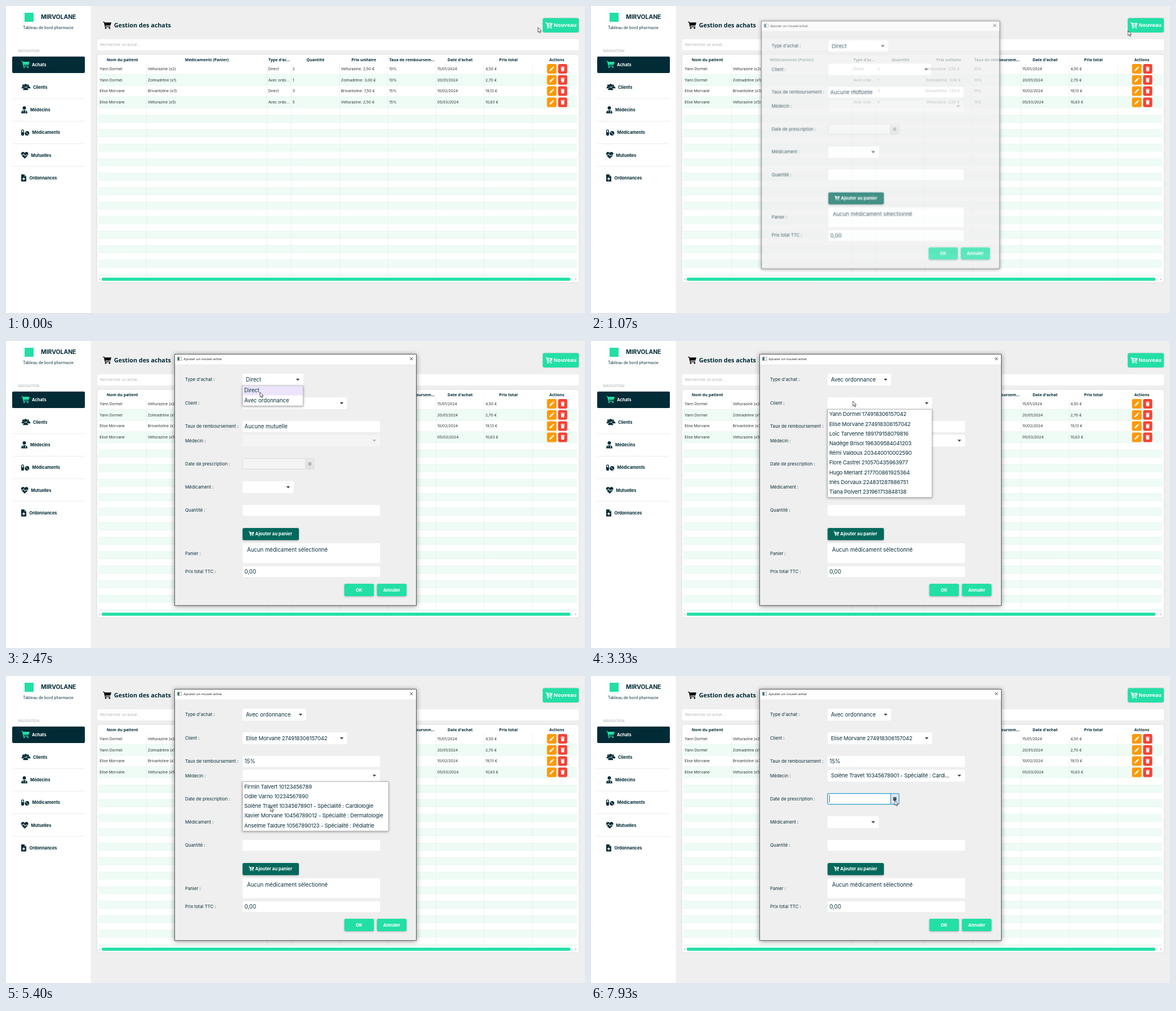
Animation of 1028x545 px, one loop 8 s. Source, as an HTML page:

```html
<!DOCTYPE html>
<html lang="fr">
<head>
<meta charset="utf-8">
<title>Gestion des achats</title>
<style>
html, body { margin: 0; width: 100%; height: 100%; overflow: hidden; background: #efefef; }
svg { display: block; }
text { font-family: Inter, "Noto Sans", sans-serif; fill: #0b303c; white-space: pre; }
.mid { text-anchor: middle; }
.brand { font-size: 10.4px; font-weight: 700; fill: #012b36; }
.sub { font-size: 6.95px; }
.section { font-size: 6.2px; fill: #a9aeb0; }
.nav { font-size: 7.45px; font-weight: 700; fill: #012b36; }
.white { fill: #fff; }
.title, .new, .head, .win { font-family: "Open Sans", "Noto Sans", sans-serif; font-weight: 700; fill: #012b36; }
.title { font-size: 10.8px; }
.new { font-size: 9px; fill: #fff; }
.head { font-size: 7.1px; }
.win { font-size: 6.1px; font-weight: 400; fill: #111; }
.hint { font-size: 6.7px; fill: #b0b0b0; }
.cell { font-size: 6.7px; fill: #2b3033; }
.label { font-size: 7.85px; }
.val { font-size: 9.65px; }
.tight { font-size: 9.6px; letter-spacing: -.2px; }
.btn { font-size: 7.8px; font-weight: 700; fill: #fff; }
.shade { filter: drop-shadow(0 1px 1.5px rgba(0,0,0,.25)); }
.menu { filter: drop-shadow(0 1.5px 2px rgba(0,0,0,.35)); }

.step { animation: 8s step-end infinite; }
#hover { animation-name: hover; }
#typeMenu { animation-name: typeMenu; }
#direct { animation-name: direct; }
#avec { animation-name: avec; }
#late { animation-name: late; }
#clientMenu { animation-name: clientMenu; }
#noClient { animation-name: noClient; }
#client { animation-name: client; }
#doctorMenu { animation-name: doctorMenu; }
#doctor { animation-name: doctor; }
#focus { animation-name: focus; }
#calHover { animation-name: calHover; }
#caret { animation-name: caret; }
#arrow { animation-name: arrow; }
#beam { animation-name: beam; }
#modal { transform-origin: 514px 246.5px; animation: open 8s linear infinite; }
#cursor { animation: move 8s ease-in-out infinite; }

@keyframes hover { 0%, 11.625% { opacity: 0 } 2.5% { opacity: .5 } 9.125% { opacity: 1 } }
@keyframes open {
  0%, 11.4% { opacity: 0; transform: scale(.92) }
  12.5% { opacity: .5; transform: scale(.97) }
  13.4% { opacity: .74; transform: scale(.986) }
  15.2%, 100% { opacity: 1; transform: none }
}
@keyframes typeMenu { 0%, 35% { opacity: 0 } 28.375% { opacity: 1 } }
@keyframes direct { 0% { opacity: 1 } 35% { opacity: 0 } 100% { opacity: 0 } }
@keyframes avec { 0% { opacity: 0 } 35%, 100% { opacity: 1 } }
@keyframes late { 0% { opacity: .35 } 35%, 100% { opacity: 1 } }
@keyframes clientMenu { 0%, 48.375% { opacity: 0 } 41.625% { opacity: 1 } }
@keyframes noClient { 0% { opacity: 1 } 48.375%, 100% { opacity: 0 } }
@keyframes client { 0% { opacity: 0 } 48.375%, 100% { opacity: 1 } }
@keyframes doctorMenu { 0%, 70.875% { opacity: 0 } 60.875% { opacity: 1 } }
@keyframes doctor { 0% { opacity: 0 } 70.875%, 100% { opacity: 1 } }
@keyframes focus { 0% { opacity: 0 } 81.625%, 100% { opacity: 1 } }
@keyframes calHover { 0% { opacity: 0 } 88.375%, 100% { opacity: 1 } }
@keyframes caret { 0%, 88.375% { opacity: 0 } 83.375%, 94.125%, 100% { opacity: 1 } }
@keyframes arrow { 0%, 54%, 88.375%, 100% { opacity: 1 } 49.1%, 71.6% { opacity: 0 } }
@keyframes beam { 0%, 54%, 88.375%, 100% { opacity: 0 } 49.1%, 71.6% { opacity: 1 } }
@keyframes move {
  0%, .8% { transform: translate(944.5px, 38px) }
  3.4%, 11.3% { transform: translate(956px, 38px) }
  12.4%, 13.5% { transform: translate(953.5px, 44px) }
  16.6%, 20.4% { transform: translate(547px, 130px) }
  26.6%, 28.4% { transform: translate(463px, 68px) }
  30.8% { transform: translate(451px, 91px) }
  32.5%, 35.2% { transform: translate(449px, 102px) }
  39.1%, 41.6% { transform: translate(465px, 107px) }
  49.1%, 51.3% { transform: translate(470.5px, 155px) }
  58.4%, 61.2% { transform: translate(485px, 177px) }
  67.4%, 68.5% { transform: translate(469.5px, 232px) }
  70.5%, 75.5% { transform: translate(470px, 230.5px) }
  81.6%, 83% { transform: translate(470px, 218px) }
  85%, 88% { transform: translate(536px, 218px) }
  90.9%, 98% { transform: translate(541px, 219px) }
  99.1%, 100% { transform: translate(539.3px, 221px) }
}
</style>
</head>
<body>
<svg id="stage" width="1028" height="545" viewBox="0 0 1028 545">
  <defs>
    <symbol id="cart" viewBox="0 0 16 14">
      <path d="M0 0H2.8L3.2 1.6H16L14.2 7.6H4.7L5 9.2H14V10.6H3.9L1.9 1.4H0Z"/>
      <circle cx="5.4" cy="12.5" r="1.4"/><circle cx="12.6" cy="12.5" r="1.4"/>
    </symbol>
    <symbol id="pencil" viewBox="0 0 10 10">
      <path d="M.5 9.5L1.1 6.9L6.2 1.8L8.2 3.8L3.1 8.9ZM6.8 1.2L7.6.4Q8 .1 8.4 .4L9.6 1.6Q9.9 2 9.6 2.4L8.8 3.2Z"/>
    </symbol>
    <symbol id="trash" viewBox="0 0 10 10">
      <path d="M1 .9H3.6L4 .3H6L6.4 .9H9V2H1ZM1.7 2.6H8.3L7.9 9Q7.8 9.8 7 9.8H3Q2.2 9.8 2.1 9Z"/>
    </symbol>
    <linearGradient id="grey" x2="0" y2="1">
      <stop stop-color="#e4e4e4"/><stop offset="1" stop-color="#c9c9c9"/>
    </linearGradient>
  </defs>
</svg>
<script>
const GREEN = '#22dfa6', DARK = '#012b36';

const rect = (x, y, w, h, fill, r = 0, more = '') =>
  `<rect x="${x}" y="${y}" width="${w}" height="${h}" rx="${r}" fill="${fill}" ${more}/>`;
const text = (x, y, str, cls) => `<text x="${x}" y="${y}" class="${cls}">${str}</text>`;
const path = (d, fill, more = '') => `<path d="${d}" fill="${fill}" ${more}/>`;
const line = (d, stroke, w = 1) => path(d, 'none', `stroke="${stroke}" stroke-width="${w}"`);
const icon = (id, x, y, w, h, fill) =>
  `<use href="#${id}" x="${x}" y="${y}" width="${w}" height="${h}" fill="${fill}"/>`;
const dot = (x, y, r, fill = DARK) => `<circle cx="${x}" cy="${y}" r="${r}" fill="${fill}"/>`;
const step = (id, body) => `<g id="${id}" class="step">${body}</g>`;
const field = (y, h, w = 244) => rect(420, y, w, h, '#fff', 2);
const caretDown = (x, y) => path(`M${x - 3.3} ${y - 1.6}h6.6l-3.3 3.6z`, '#444');

function sidebar() {
  const items = [['Achats', 46], ['Clients', 48], ['Médecins', 43], ['Médicaments', 46.5], ['Mutuelles', 44.5], ['Ordonnances', 41.5]];
  const person = (x, y, s) =>
    dot(x, y - 2.6 * s, 2.2 * s) + path(`M${x - 3.6 * s} ${y + 4 * s}q0 -4 3.6 -4h${.01}q3.6 0 3.6 4z`, DARK);
  const icons =
    icon('cart', 27, 97.5, 15, 13, GREEN) +
    person(30.5, 143, .8) + person(39, 143, .8) +
    path('M30 149.5q0 -5 4.8 -5q4.8 0 4.8 5z', DARK, 'stroke="#fff" stroke-width=".6"') + dot(34.8, 141, 2.7) +
    dot(32.5, 181, 3) + path('M27 190.4q0 -5.4 5.5 -5.4q5.5 0 5.5 5.4z', DARK) +
    line('M30.5 185.5v3M34.5 185.5v2', '#fff', .8) + dot(34.5, 188.2, .9, '#fff') +
    rect(27, 219.3, 5, 11, DARK, 2.5) + rect(28.3, 220.6, 2.4, 3.6, '#fff', 1.2) +
    dot(37.3, 226, 4) + line('M34 222.7l6.6 6.6', '#fff', 1) +
    path('M33.2 271L27.8 265.4Q25.8 262.4 27.8 260Q30.6 257.8 33.2 260.8Q35.8 257.8 38.6 260Q40.6 262.4 38.6 265.4Z', DARK) +
    line('M26.5 264.6h3.6l1.4 -2.4l2 4.6l1.5 -2.2h5', '#fff', 1) +
    path('M27 299h5.6l3.4 3.4v8.6q0 .6 -.6 .6h-7.8q-.6 0 -.6 -.6z', DARK) +
    path('M32.6 299v3.4h3.4z', '#8fa3a8') + line('M31.5 304.3v5M29 306.8h5', '#fff', 1.4);
  return rect(0, 0, 150.5, 545, '#fff') + rect(33, 12, 16, 16, GREEN) +
    text(62, 23.4, 'MIRVOLANE', 'brand') + text(30, 41, 'Tableau de bord pharmacie', 'sub') +
    text(21.5, 82, 'NAVIGATION', 'section') + rect(11, 89.7, 129, 29.3, DARK, 2) +
    [164.5, 204.5, 244.5, 284.5].map(y => line(`M11 ${y}H140`, '#ececec')).join('') +
    items.map(([name, x], i) => text(x, 106.8 + 40.2 * i, name, i ? 'nav' : 'nav white')).join('') + icons;
}

function table() {
  const cols = [164, 249.5, 463.5, 506.5, 592.5, 678, 763.5, 849, 935, 1014];
  const heads = ['Nom du patient', 'Médicaments (Panier)', 'Type d\'ac...', 'Quantité', 'Prix unitaire',
    'Taux de remboursem...', 'Date d\'achat', 'Prix total', 'Actions'];
  const yann = 'Yann Dormel', elise = 'Elise Morvane', rx = 'Avec ordo...';
  const rows = [
    [yann, 'Velturazine (x2)', 'Direct', '2', 'Velturazine: 2,50 €', '10%', '15/01/2024', '4,50 €'],
    [yann, 'Zolmadrène (x1)', rx, '1', 'Zolmadrène: 3,00 €', '10%', '20/01/2024', '2,70 €'],
    [elise, 'Brivantoline (x3)', 'Direct', '3', 'Brivantoline: 7,50 €', '15%', '10/02/2024', '19,13 €'],
    [elise, 'Velturazine (x5)', rx, '5', 'Velturazine: 2,50 €', '15%', '05/03/2024', '10,63 €'],
  ];
  const band = (y, h) => rect(164, y, 850, h, '#effcf6') + line(`M164 ${y}H1014M164 ${y + h}H1014`, '#e3f0ea', .6);
  let out = rect(162, 86.5, 855, 404, '#fff', 4, 'class="shade" style="filter:drop-shadow(0 0 1px #0002)"');
  out += band(121.4, 19.8) + band(161, 19.8);
  for (let i = 1; i < 24; i += 2) {
    const y = 180.8 + 12.87 * i;
    out += band(y, Math.min(12.87, 479.5 - y));
  }
  out += cols.slice(1, 9).map(x => line(`M${x} 102V479`, '#e6ebe9', .7)).join('');
  out += heads.map((h, i) => text((cols[i] + cols[i + 1]) / 2 + (i == 8 ? 3.5 : 0), 98.3, h, 'head mid')).join('');
  rows.forEach((row, r) => {
    const y = 111.5 + 19.8 * r;
    out += row.map((c, i) => text(cols[i] + 2.2, y + 2.2, c, 'cell')).join('');
    out += rect(960.5, y - 8.5, 17, 17, '#ff9800', 3) + icon('pencil', 964.3, y - 4.7, 9.4, 9.4, '#fff');
    out += rect(980.3, y - 8.5, 16.2, 17, '#f44336', 3) + icon('trash', 984, y - 4.6, 8.8, 9.2, '#fff');
  });
  return out + rect(170, 482.3, 832, 5.4, GREEN, 2) +
    line('M167.6 483.2l-1.8 1.8l1.8 1.8M1010.6 483.2l1.8 1.8l-1.8 1.8', '#888', .8);
}

function page() {
  return rect(0, 0, 1028, 545, '#efefef') + sidebar() +
    icon('cart', 172, 27.5, 15, 13.4, '#000') + text(191.7, 37.7, 'Gestion des achats', 'title') +
    rect(953, 21.5, 64, 25.5, GREEN, 3, 'class="shade" style="filter:drop-shadow(0 0 1px #0003)"') +
    step('hover', rect(953, 21.5, 64, 25.5, '#1cc893', 3)) +
    icon('cart', 958, 29, 12.6, 11.2, '#fff') + line('M965 30.6v4M963 32.6h4', GREEN, 1.1) +
    text(972.3, 37.4, 'Nouveau', 'new') +
    rect(162, 59, 855, 19.7, '#fff', 3) + text(167, 71.3, 'Rechercher un achat...', 'hint') + table();
}

const ROW = 17.2;
function menu(id, y, w, items, picked) {
  const h = ROW * items.length + 1.4;
  return step(id, `<g class="menu">${rect(420, y, w, h, '#fff', 0, 'stroke="#a8a8a8" stroke-width=".7"')}</g>` +
    (picked ? rect(420.5, y + .5, w - 1, ROW - .4, '#ebe4fc') : '') +
    items.map((s, i) => text(423, y + 12.1 + ROW * i, s, id == 'typeMenu' ? 'val' : 'tight')).join(''));
}

function modal() {
  const labels = [['Type d\'achat', 71.2], ['Client', 113], ['Taux de remboursement', 154.4], ['Médecin', 179.6],
    ['Date de prescription', 220.8], ['Médicament', 262], ['Quantité', 303.3], ['Panier', 379.5], ['Prix total TTC', 412]];
  const clients = ['Yann Dormel', 'Elise Morvane', 'Loïc Tarvenne', 'Nadège Brisol', 'Rémi Valdoux',
    'Flore Castrel', 'Hugo Merlant', 'Inès Dorvaux', 'Tiana Polvert'];
  const clientRow = (name, i) => `${name} ${i == 1 ? '274918306157042' : 174918306157042 + i * 7130425961387}`;
  const solene = 'Solène Travet 10345678901 - Spécialité : Cardi';
  const doctors = ['Firmin Talvert 10123456789', 'Odile Varno 10234567890', solene + 'ologie',
    'Xavier Morvane 10456789012 - Spécialité : Dermatologie', 'Anselme Taldure 10567890123 - Spécialité : Pédiatrie'];
  const button = (x, name) => rect(x, 431, 52.5, 22, GREEN, 2.5, 'class="shade"') + text(x + 26.2, 444.6, name, 'btn mid');
  const calendar = rect(536.6, 215.3, 5.6, 5.8, '#333', .5) + line('M537.2 217.2h4.4M537.2 219h4.4', '#aaa', .5);
  const date = rect(420, 208.5, 112, 19, '#fff', 1.5, 'stroke="#b0b0b0" stroke-width=".9"') +
    rect(532, 208.5, 15, 19, 'url(#grey)', 1.5, 'stroke="#b0b0b0" stroke-width=".8"');

  return rect(299.5, 23.5, 429, 446, '#efefef', 0,
      'stroke="#5c5c5c" style="filter:drop-shadow(0 1px 4px rgba(0,0,0,.45))"') +
    rect(300, 24, 428, 17.3, '#fff') +
    rect(304.4, 28.4, 7.6, 6.4, '#fff', 0, 'stroke="#999" stroke-width=".7"') + rect(304.8, 29, 3, 5.4, '#2d6f6a') +
    text(315.3, 34.3, 'Ajouter un nouvel achat', 'win') + line('M717.3 29l5 5m0 -5l-5 5', '#222', .9) +
    labels.map(([s, y]) => text(318, y, s + ' :', 'label')).join('') +
    step('direct', field(58, 21, 108) + text(426, 72.1, 'Direct', 'val') + caretDown(518, 68.5)) +
    step('avec', field(58, 21, 113) + text(426, 72.1, 'Avec ordonnance', 'val') + caretDown(523, 68.5)) +
    field(100, 21, 185.5) + caretDown(596, 110.4) + step('client', text(426, 113.9, clientRow('Elise Morvane', 1), 'tight')) +
    field(142, 19.5) + step('noClient', text(423.5, 155.2, 'Aucune mutuelle', 'val')) +
    `<g id="pct">${step('client', text(423.5, 155.2, '15%', 'val'))}</g>` +
    step('late', field(166.5, 21) + caretDown(654, 176.8) + date + calendar) +
    step('doctor', text(426, 180.4, solene + '...', 'tight')) +
    step('focus', rect(420.3, 208.6, 126.6, 19, 'none', 1.5, 'stroke="#2b9fd0" stroke-width="1.2"') +
      line('M532.2 208.5v19', '#2b9fd0', 1)) +
    step('calHover', rect(532.8, 209.2, 13.5, 17.8, '#d5e6ef') + calendar) +
    step('caret', line('M423.6 211.5v13', '#222', .8)) +
    field(249, 21, 91) + caretDown(501, 259.4) + field(291, 19.3) +
    rect(420, 332, 100, 21.5, '#00695c', 2.5, 'class="shade"') + icon('cart', 431, 338, 9.6, 8.6, '#fff') +
    line('M436.3 339v3.2M434.7 340.6h3.2', '#00695c', .8) + text(442.6, 345.4, 'Ajouter au panier', 'btn') +
    field(359, 35.2) + text(428, 374.2, 'Aucun médicament sélectionné', 'val') +
    field(400, 19) + text(423.5, 412.9, '0,00', 'val') + button(600.7, 'OK') + button(658.6, 'Annuler') +
    menu('typeMenu', 79.3, 107.5, ['Direct', 'Avec ordonnance'], true) +
    menu('clientMenu', 121.3, 185.5, clients.map(clientRow)) +
    menu('doctorMenu', 187.7, 259, doctors);
}

const cursor =
  step('arrow', path('M0 0V8.6L2 6.8L3.4 9.9L4.8 9.3L3.4 6.3H6.1Z', '#fff', 'stroke="#111" stroke-width=".7"')) +
  step('beam', line('M-1.8 -4h3.6M-1.8 4.2h3.6M0 -4v8.2', '#222', .8));

document.getElementById('stage').insertAdjacentHTML('beforeend',
  `${page()}<g id="modal">${modal()}</g><g id="cursor">${cursor}</g>`);
</script>
</body>
</html>
```
